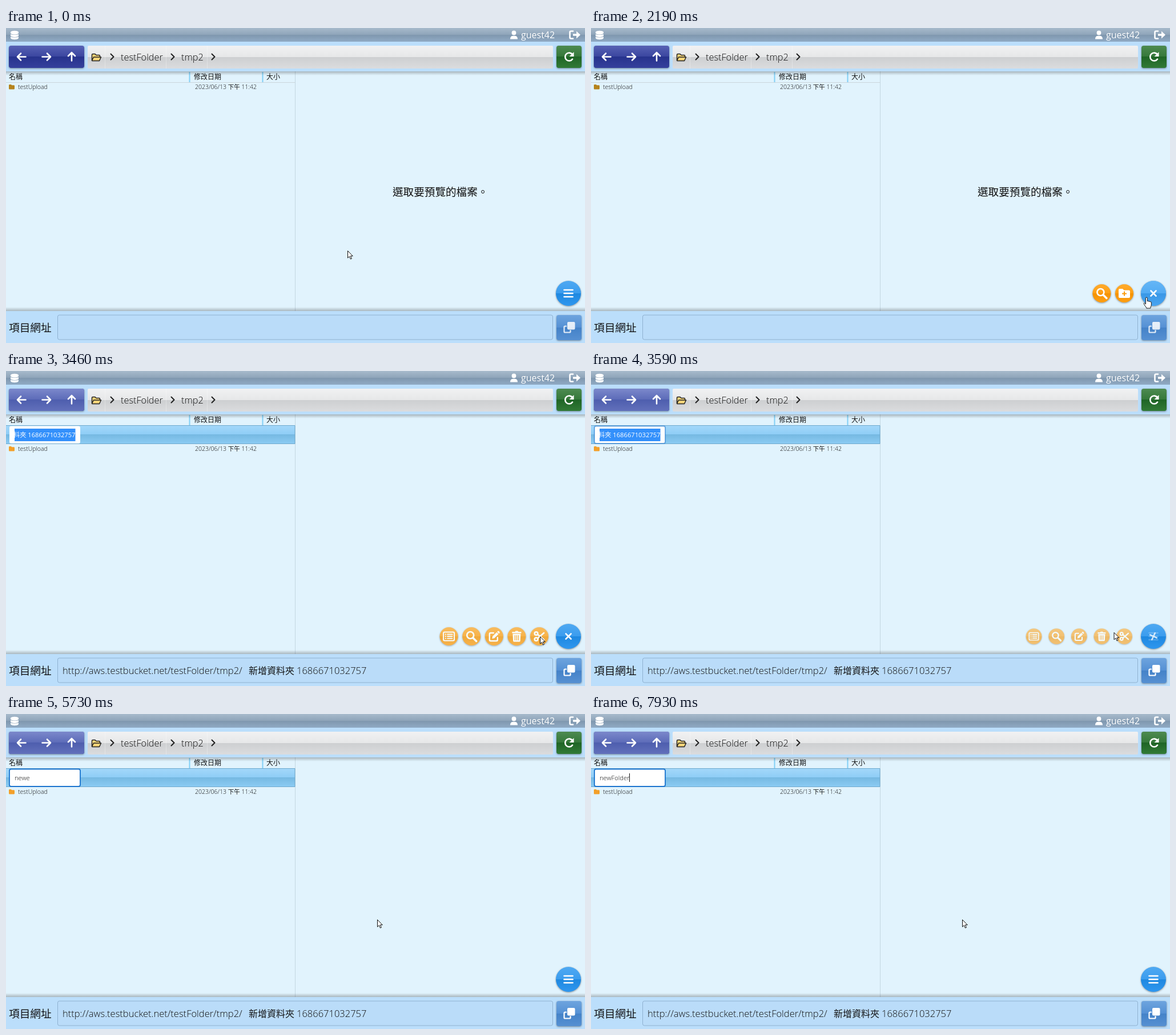
Animation, 1014 px wide and 552 px high, one loop 8000 ms. Source, as an HTML page:

```html
<!DOCTYPE html>
<html lang="zh-Hant">
<head>
<meta charset="utf-8">
<title>File manager</title>
<style>
html, body { margin: 0; width: 100%; height: 100%; overflow: hidden; background: #e1f3fd; }
svg { display: block; width: 100%; height: 100%; }
text { font-family: "Open Sans", "Noto Sans CJK TC", "Noto Sans CJK JP", "Noto Sans CJK", sans-serif; fill: #111; white-space: pre; }
.thin { font-weight: 300; }
.btn { filter: drop-shadow(0 1px 1.5px rgba(0,0,0,.4)); }
.line { fill: none; stroke: #fff; stroke-width: 2.6; stroke-linecap: round; stroke-linejoin: round; }
.white { fill: #fff; }
.mark { fill: #fa9a0a; }
</style>
</head>
<body>
<svg viewBox="0 0 1014 552" xmlns="http://www.w3.org/2000/svg">
  <defs id="defs"></defs>

  <rect width="1014" height="552" fill="#e1f3fd"/>

  <!-- file list -->
  <path d="M0 95.5H506" stroke="#cbd5db"/>
  <path d="M321.5 77V95M449.5 77V95" stroke="#82d0f6" stroke-width="2"/>
  <path d="M506.5 76V496" stroke="#c3d6e1"/>
  <g font-size="12">
    <text x="5" y="90">名稱</text>
    <text x="329" y="90">修改日期</text>
    <text x="456" y="90">大小</text>
  </g>
  <g id="item">
    <path id="folder" d="M5 100.3q0-1.3 1.3-1.3h2.6l1.3 1.3h3.5q1.3 0 1.3 1.3v4.6q0 1.3-1.3 1.3H6.300q-1.300 0-1.300-1.300z"/>
    <g class="thin" font-size="10.5">
      <text x="21" y="107">testUpload</text>
      <text x="331" y="107">2023/06/13 下午 11:42</text>
    </g>
  </g>
  <g id="rename">
    <rect y="95" width="506" height="33" fill="url(#row)"/>
    <path d="M0 95.500H506V127.500H0" fill="none" stroke="#6fa9cd"/>
    <rect x="6" y="96.500" width="124" height="30.500" rx="3" fill="#fff"/>
    <rect id="ring" x="6" y="96.500" width="124" height="30.500" rx="3" fill="none" stroke="#1b74ce" stroke-width="1.800"/>
    <g id="picked" clip-path="url(#field)">
      <rect x="15" y="101" width="106.500" height="22" fill="#3390fb"/>
      <text x="121.500" y="115.500" font-size="11.200" text-anchor="end" style="fill:#fff">新增資料夾 1686671032757</text>
    </g>
    <text id="typed" class="thin" x="15" y="115.500" font-size="11.200"></text>
    <rect id="caret" y="104" width="1" height="15" fill="#111"/>
  </g>
  <text id="hint" class="thin" x="677" y="293.500" font-size="18.600">選取要預覽的檔案。</text>

  <!-- header -->
  <rect y="76" width="1014" height="7" fill="url(#fall)"/>
  <rect y="24" width="1014" height="52" fill="#bbdefb"/>
  <rect width="1014" height="24" fill="url(#bar)"/>
  <g class="white">
    <path d="M8 7.500a7 2.700 0 0 1 14 0v1.300a7 2.700 0 0 1-14 0zM8 11a9 3 0 0 0 14 0v2.500a7 2.500 0 0 1-14 0zM8 15.500a9 3 0 0 0 14 0V17.500a7 2.700 0 0 1-14 0z"/>
    <circle cx="889.500" cy="8.500" r="3.900"/>
    <path d="M883 19.500q0-5.800 5-5.800h3q5 0 5 5.800z"/>
  </g>
  <text x="902" y="18" font-size="16" style="fill:#fff">guest42</text>
  <path class="line" d="M993 5.500h-3.500q-2 0-2 2v9q0 2 2 2h3.500"/>
  <path class="white" d="M993 10.200h6V5.500l7 6.500-7 6.500v-4.700h-6z"/>

  <g class="btn">
    <rect x="5" y="31" width="132" height="39" rx="4" fill="url(#nav)"/>
    <rect id="navOff" x="5" y="31" width="132" height="39" rx="4" fill="url(#dim)"/>
  </g>
  <path class="line" d="M34.500 50.500H20m6-6-6 6 6 6M63.500 50.500H78m-6-6 6 6-6 6M115 57.500V43m-6 6 6-6 6 6"/>
  <rect x="143" y="31" width="815" height="40" rx="2" fill="url(#path)"/>
  <path d="M173.500 31V71M280.500 31V71M352.500 31V71" stroke="#fff" stroke-opacity=".3"/>
  <path d="M150.500 57V47q0-1.500 1.500-1.500h4l2 2h5q1.500 0 1.500 1.500v2M150.500 57l3-6h13l-3 6.500h-12.500z" fill="#f7d579" stroke="#222" stroke-width="1.500" stroke-linejoin="round"/>
  <path class="line" d="M183.500 45.500l5 5-5 5m106-10 5 5-5 5m71-10 5 5-5 5" style="stroke:#222;stroke-width:2"/>
  <g class="thin" font-size="16.300">
    <text x="201" y="56.500">testFolder</text>
    <text x="307" y="56.500">tmp2</text>
  </g>
  <rect class="btn" x="964" y="31" width="44" height="39" rx="4" fill="url(#green)"/>
  <path class="line" d="M992 54.500a7 7 0 1 1 .3-7.500"/>
  <path class="white" d="M994.500 42v8h-8z"/>

  <!-- footer -->
  <rect y="489" width="1014" height="7" fill="url(#rise)"/>
  <rect y="496" width="1014" height="56" fill="#bbdefb"/>
  <text x="5" y="532" font-size="18.700" font-weight="500">項目網址</text>
  <rect x="90.500" y="503" width="867" height="43" rx="3" fill="#badcf9" stroke="#8fb1d0"/>
  <g id="url" class="thin" font-size="16.500">
    <text x="99" y="530.500">http://aws.testbucket.net/testFolder/tmp2/</text>
    <text x="425" y="530.500" font-size="16">新增資料夾</text>
    <text x="509" y="530.500">1686671032757</text>
  </g>
  <rect class="btn" x="964" y="503" width="44" height="44" rx="4" fill="url(#copy)"/>
  <g id="clone">
    <path class="line" d="M981 522.500h-2q-1.500 0-1.500 1.500v8q0 1.500 1.500 1.500h8q1.500 0 1.500-1.500v-2" style="stroke-width:2.200"/>
    <rect class="white" x="983" y="515" width="13.500" height="13.500" rx="2"/>
  </g>

  <!-- floating menu -->
  <g id="menu"></g>
  <g class="btn">
    <circle cx="985" cy="465" r="22" fill="url(#fab)"/>
    <circle id="hover" cx="985" cy="465" r="22" fill="url(#glow)"/>
  </g>
  <path id="bars" class="line" d="M977.500 459h15m-15 6h15m-15 6h15"/>
  <path id="cross" class="line" d="M980.500 460.500l9 9m0-9-9 9"/>

  <g id="pointer" fill="#fff" stroke="#111" stroke-linejoin="round">
    <path id="arrow" d="M.5.500V13l2.900-2.700 2 4.700 2-.9-2-4.500h3.900z"/>
    <path id="hand" d="M-2 12V1.500a1.500 1.500 0 0 1 3 0V7a1.400 1.400 0 0 1 2.600.4a1.400 1.400 0 0 1 2.400.5a1.300 1.300 0 0 1 2 .9V13c0 2-1.500 3-1.500 6h-7c0-2-3-4-4.500-7.500c-.6-1.800 1.200-2.200 2-.8z"/>
  </g>
</svg>
<script>
const LOOP = 8000, CREATED = 3460;
const $ = id => document.getElementById(id);

// Glossy fills: two halves with a hard edge in the middle
const gloss = {
  bar: ['#a7bacb', '#8ea4b9', '#7f97ae', '#90aac4'],
  nav: ['#5762b4', '#3a459f', '#27338d', '#35409c'],
  dim: ['#7b88cb', '#5c6bb8', '#4e5eae', '#6270bb'],
  path: ['#f1f1f2', '#e6e7e8', '#cdcfd1', '#dbdcde'],
  green: ['#4d8a50', '#35783a', '#1f6526', '#317a36'],
  copy: ['#6ea4de', '#5490d4', '#4482c8', '#5690d2'],
  fab: ['#4fa9f2', '#3a9cee', '#1e88e0', '#2f97ef'],
  glow: ['#6dbaf7', '#5ab0f5', '#429de8', '#52a9f2'],
  orange: ['#ffab2e', '#ff9f12', '#f39200', '#ff9f14'],
  row: ['#a4d8fa', '#8ecdf6', '#76b9e2', '#8cccf4']
};
const shade = (id, a, b) => `<linearGradient id="${id}" x2="0" y2="1">
  <stop stop-opacity="${a}"/><stop offset="1" stop-opacity="${b}"/></linearGradient>`;
$('defs').innerHTML = Object.entries(gloss).map(([id, c]) =>
  `<linearGradient id="${id}" x2="0" y2="1">` +
  c.map((v, i) => `<stop offset="${[0, .5, .5, 1][i]}" stop-color="${v}"/>`).join('') +
  '</linearGradient>').join('') + shade('fall', .25, 0) + shade('rise', 0, .25) +
  '<clipPath id="field"><rect x="15" y="98" width="107" height="28"/></clipPath>';

const icons = {
  search: '<circle class="line" cx="-2" cy="-2" r="6"/><path class="line" d="M3 3l5.500 5.500" style="stroke-width:3.400"/>',
  add: '<path class="white" d="M-10-6q0-2 2-2h5l2.500 2.500H8q2 0 2 2V6q0 2-2 2H-8q-2 0-2-2z"/><path class="mark" d="M-1-3.500h2v3h3v2H1v3h-2v-3h-3v-2h3z"/>',
  list: '<rect class="line" x="-9.500" y="-7.500" width="19" height="15" rx="2" style="stroke-width:2"/><path class="line" d="M-6-3.500h.5m3 0H6M-6 0h.5m3 0H6M-6 3.500h.5m3 0H6" style="stroke-width:2"/>',
  edit: '<path class="line" d="M-1-6h-5q-2 0-2 2v10q0 2 2 2H4q2 0 2-2V2" style="stroke-width:2.400"/><path class="white" d="M-3.500 4l.8-4L4.500-7.200l3.200 3.200L.5 3.200zM5.300-8l1-1q1-.8 2 0l1.200 1.200q.8 1 0 2l-1 1z"/>',
  trash: '<path class="white" d="M-8-8h5l1-1.500h4L3-8h5v2.500H-8zM-7-4.500H7L6.300 8q-.2 1.500-1.800 1.500h-9Q-6.100 9.500-6.300 8z"/><path d="M-3-2V7M0-2V7M3-2V7" stroke="#fa9a0a" stroke-width="1.300"/>',
  cut: '<g class="line"><circle cx="-5.500" cy="-5" r="2.800"/><circle cx="-5.500" cy="5" r="2.800"/><path d="M-3-3.500L8 6M-3 3.500L8-6"/></g>'
};
const makeSet = names => names.map((name, i) => {
  const g = document.createElementNS('http://www.w3.org/2000/svg', 'g');
  g.innerHTML = `<circle class="btn" r="16" fill="url(#orange)"/>${icons[name]}`;
  $('menu').append(g);
  return { g, x: 934 - i * 39.6 };
});
const basic = makeSet(['add', 'search']);
const full = makeSet(['cut', 'trash', 'edit', 'search', 'list']);

// [time, x, y]
const moves = [
  [740, 598, 390], [1500, 981, 473], [1570, 982, 474], [1840, 982, 474],
  [2560, 964, 470], [2790, 935, 464], [3400, 935, 465], [3500, 935, 465], [4070, 650, 360]
];
const glow = [[1400, 0], [1480, 1], [1640, 1], [1650, .75], [2600, .75], [2750, 0]];
const typing = [
  [4860, 'n'], [5070, 'ne'], [5140, 'new'], [5200, 'newe'], [6140, 'new'], [7110, 'newF'],
  [7310, 'newFo'], [7440, 'newFol'], [7590, 'newFold'], [7800, 'newFolde'], [7930, 'newFolder']
];
const blink = [[0, 0], [4860, 1], [5730, 0], [6280, 1], [6780, 0], [7110, 1]];

const ramp = (t, a, b) => {
  const p = Math.min(1, Math.max(0, (t - a) / (b - a)));
  return p * p * (3 - 2 * p);
};
const tween = (t, keys, col) => {
  const i = keys.findIndex(k => k[0] > t);
  if (i === 0) return keys[0][col];
  if (i < 0) return keys[keys.length - 1][col];
  const a = keys[i - 1], b = keys[i];
  return a[col] + (b[col] - a[col]) * ramp(t, a[0], b[0]);
};
const held = (t, keys, first) => keys.reduce((v, k) => t >= k[0] ? k[1] : v, first);
const show = (id, v) => $(id).setAttribute('opacity', +v);
const place = (b, p, alpha) => {
  b.g.setAttribute('transform', `translate(${b.x} 465) scale(${.4 + .6 * p})`);
  b.g.setAttribute('opacity', p * alpha);
};

function draw(t) {
  const made = t >= CREATED;
  const open = ramp(t, 1820, 2040) * (1 - ramp(t, 3530, 3730));

  $('item').setAttribute('transform', `translate(0 ${made ? 33 : 0})`);
  $('folder').setAttribute('fill', made ? '#f3a02a' : '#b5831d');
  for (const id of ['rename', 'navOff', 'url']) show(id, made);
  show('hint', !made);
  show('clone', made ? 1 : .85);
  show('ring', ramp(t, 3480, 3680));

  const text = held(t, typing, '');
  show('picked', !text);
  $('typed').textContent = text;
  show('caret', held(t, blink, 0));
  $('caret').setAttribute('x', Math.round(15 + (text ? $('typed').getComputedTextLength() : 0)));

  basic.forEach((b, i) => place(b, made ? 0 : ramp(t, 1820 + i * 60, 2040 + i * 60), 1));
  full.forEach(b => place(b, made ? open : 0, .76));
  show('hover', tween(t, glow, 1));
  show('bars', 1 - open);
  show('cross', open);
  $('cross').setAttribute('transform', `rotate(${90 * (open - 1)} 985 465)`);

  const hand = t >= 1400 && !made;
  show('hand', hand);
  show('arrow', !hand);
  $('pointer').setAttribute('transform', `translate(${tween(t, moves, 1)} ${tween(t, moves, 2)})`);
}

const start = performance.now();
function tick() {
  draw((performance.now() - start) % LOOP);
  requestAnimationFrame(tick);
}
tick();
</script>
</body>
</html>
```
